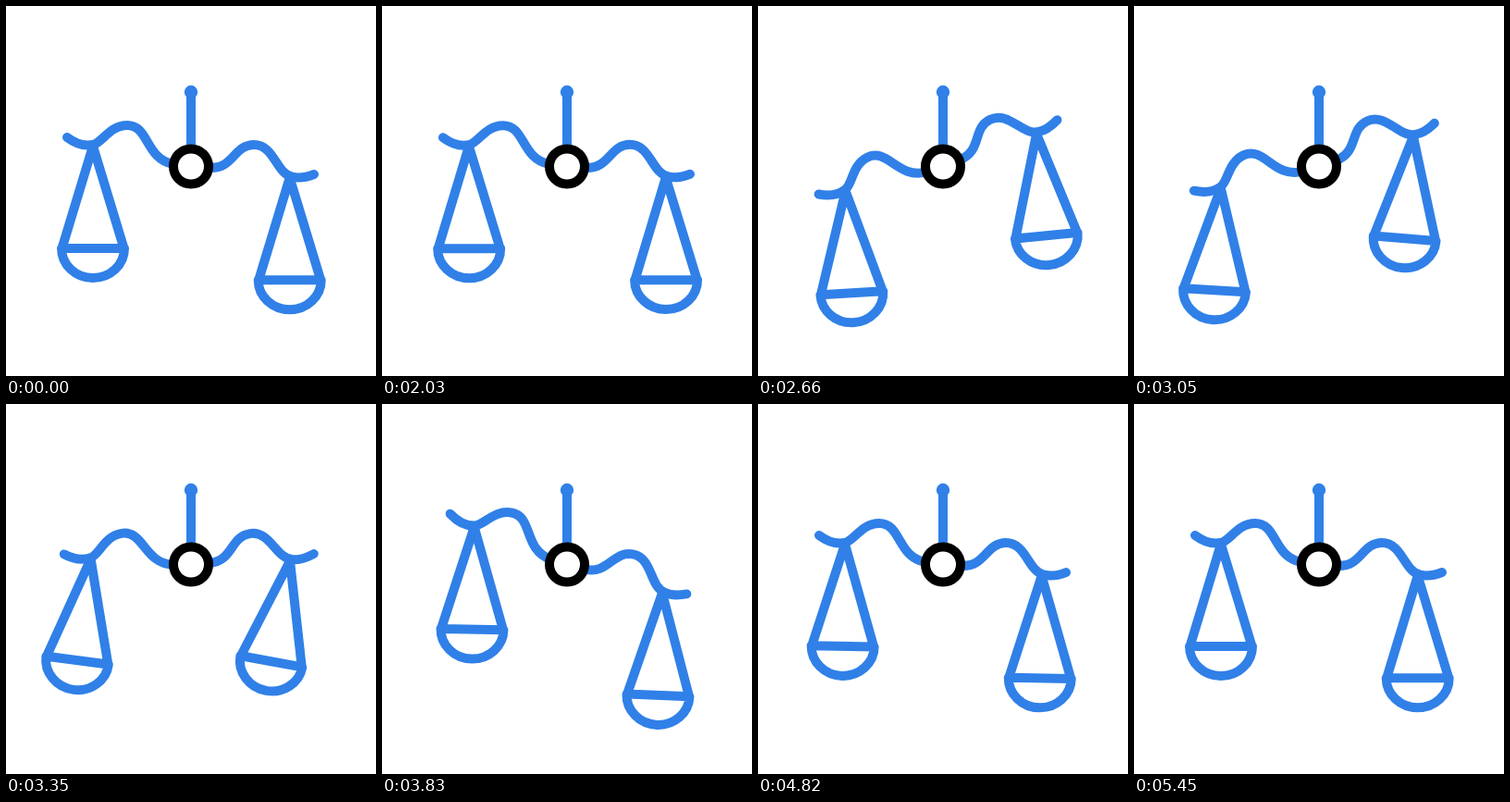
Recreate the animation shown at these times as an HTML page. Size 400 px wide and 400 px high, loop 5660 ms.

```html
<!DOCTYPE html>
<html lang="en">
<head>
<meta charset="utf-8">
<title>Swinging scales</title>
<style>
  html, body { margin: 0; width: 100%; height: 100%; overflow: hidden; background: #fff; }
  svg { display: block; width: 100vw; height: 100vh; }
  .line { fill: none; stroke: #3080e8; stroke-width: 10; stroke-linecap: round; stroke-linejoin: round; }
</style>
</head>
<body>
<svg viewBox="0 0 400 400">
  <defs>
    <path id="pan" d="M0 1 L-33.5 111.5 H33.5 Z M-34 111.5 A34 32 0 0 0 34 111.5"/>
  </defs>
  <g class="line">
    <path d="M200 93 V160"/>
    <circle cx="200" cy="93" r="2.2"/>
    <g id="beam">
      <path d="M66 142 C74 148 84 152 94 150 C104 148 112 129 131 129 C155 129 150 165 181 171"/>
      <path d="M219 175 C246 177 246 150 268 150 C290 150 292 181 309 184.5 C317 187 325 185 333 182"/>
      <use id="left" href="#pan"/>
      <use id="right" href="#pan"/>
    </g>
  </g>
  <circle cx="200" cy="173.5" r="19" fill="#fff" stroke="#000" stroke-width="10"/>
</svg>
<script>
  const LOOP = 5660, START = 2030, STEP = 30;

  // [time in ms, angle in degrees]
  const beamKeys = [[2000, 0], [2860, -28], [3830, 10.2], [4450, -1.8], [4950, 0.4], [5450, 0]];
  const leftKeys = [[2000, 0], [2360, -6], [3470, 8], [4080, -2.8], [4830, 1.2], [5450, 0]];
  const rightKeys = [[2000, 0], [2360, -9.3], [3450, 11], [4150, -4.4], [4830, 1], [5450, 0]];

  const smooth = u => u * u * (3 - 2 * u);

  // Cubic Bezier (.3, 0, .5, 1): the beam's first, quicker drop
  function drop(u) {
    let lo = 0, hi = 1;
    for (let i = 0; i < 24; i++) {
      const s = (lo + hi) / 2, r = 1 - s;
      if (0.9 * r * r * s + 1.5 * r * s * s + s * s * s < u) lo = s; else hi = s;
    }
    return smooth(lo);
  }

  function angle(keys, t, firstEase = smooth) {
    if (t <= keys[0][0]) return keys[0][1];
    for (let i = 1; i < keys.length; i++) {
      const [t0, a] = keys[i - 1], [t1, b] = keys[i];
      if (t < t1) return a + (b - a) * (i === 1 ? firstEase : smooth)((t - t0) / (t1 - t0));
    }
    return keys[keys.length - 1][1];
  }

  const byId = id => document.getElementById(id);
  const beam = byId('beam'), left = byId('left'), right = byId('right');

  function pose(t) {
    t = t < START ? 0 : START + Math.floor((t - START) / STEP) * STEP;
    const tilt = angle(beamKeys, t, drop);
    const hang = (pan, x, y, keys) =>
      pan.setAttribute('transform', `translate(${x} ${y}) rotate(${angle(keys, t) - tilt})`);
    beam.setAttribute('transform', `rotate(${tilt} 200 173.5)`);
    hang(left, 94, 150.5, leftKeys);
    hang(right, 306.7, 184.8, rightKeys);
  }

  const begin = performance.now();
  function tick() {
    pose((performance.now() - begin) % LOOP);
    requestAnimationFrame(tick);
  }
  tick();
</script>
</body>
</html>
```
